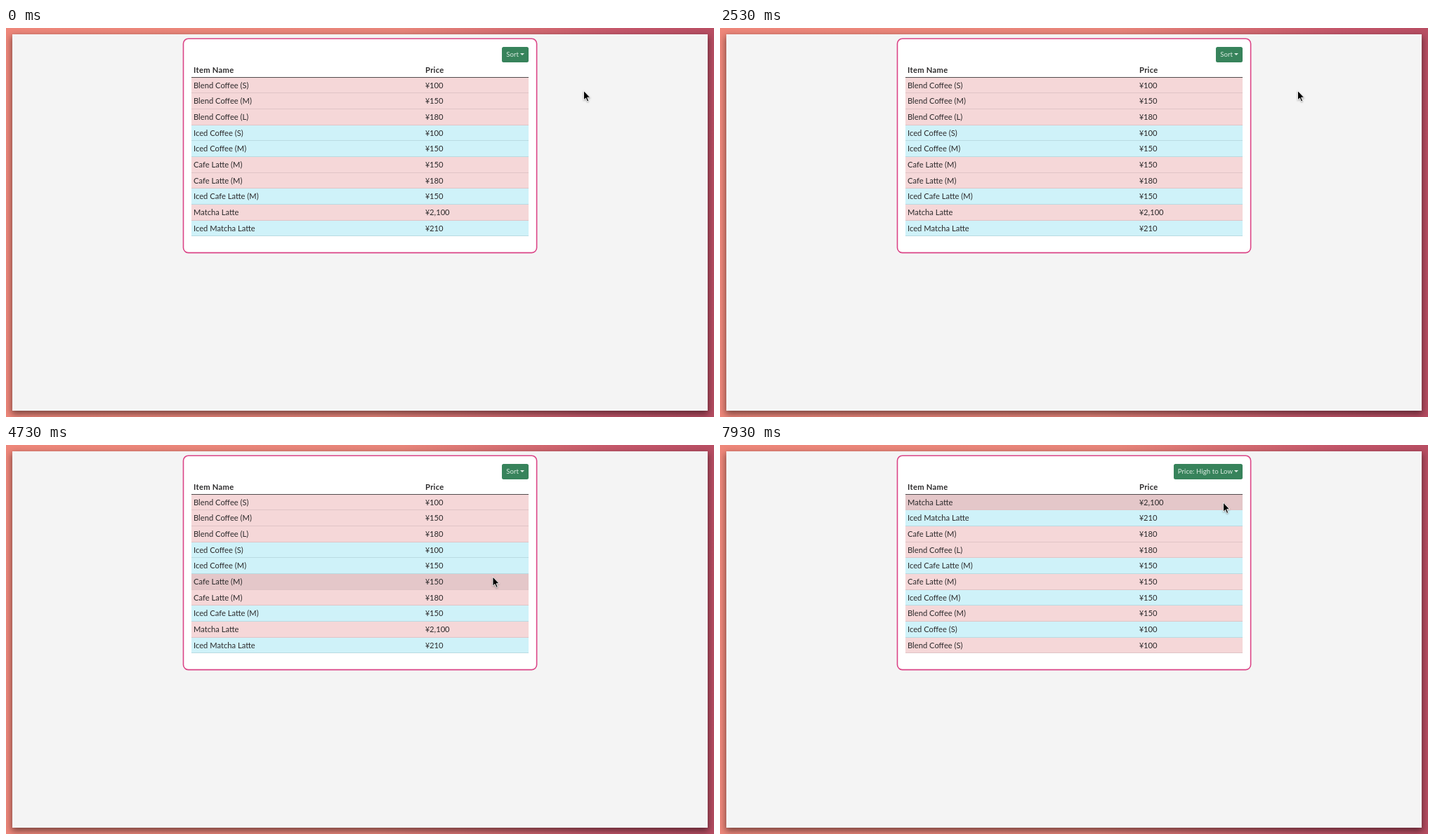
These frames come from a looping animation (1008 by 555 pixels, 8 s). An HTML page:

```html
<!DOCTYPE html>
<html lang="en">
<head>
<meta charset="utf-8">
<title>Sortable menu</title>
<style>
html, body { margin: 0; width: 100%; height: 100%; overflow: hidden; }
body {
  position: relative;
  background: linear-gradient(94deg, #ee877a 0, #e8857a 54%, #c4566a 84%, #b54c61);
  font: 11.2px/21px Lato, sans-serif;
  color: #2c2a2b;
}
div, svg { position: absolute; box-sizing: border-box; white-space: nowrap; }
#page { left: 9px; top: 9px; width: 990px; height: 537px; background: #f4f4f4; box-shadow: 0 4px 9px 1px #0007; }
#card { left: 0; top: 0; fill: #fff; stroke: #db4587; stroke-width: 1.6; }
#head { left: 264px; top: 48.5px; width: 480px; height: 22.5px; border-bottom: 1px solid #514b4c; font-weight: bold; letter-spacing: .3px; }
.row { left: 264px; width: 480px; height: 22.67px; border-bottom: 1px solid; line-height: 22px; }
.hot { background: #f5d7d8; border-color: #e0c4c6; }
.iced { background: #cff2f9; border-color: #b9dbe2; }
.hot.over { background: #e4c7c9; }
.iced.over { background: #bfe3eb; }
.name { left: 3px; top: 0; }
.price { left: 333px; top: 0; }
.price i { font: 11px/1 "Noto Sans CJK JP", "Noto Sans CJK", sans-serif; }
#bar { left: 0; top: 0; width: 744px; height: 0; }
#button {
  right: 0; top: 27px; height: 21.5px; padding: 0 14px 0 6px;
  border-radius: 2.5px; background: #37835b; color: #dcebe2; font-size: 9.6px; letter-spacing: .07px;
}
#button::after {
  content: ""; position: absolute; right: 6px; top: 9px;
  border: 3px solid transparent; border-top-color: #dcebe2; border-bottom: 0;
}
#button.over { background: #1d6d45; }
#button.focus { box-shadow: 0 0 0 2.4px #9cc4ae; }
#menu { left: 631px; top: 50px; width: 113px; height: 56px; border: 1px solid #ccc; border-radius: 3px; background: #fff; }
.item { left: 0; width: 100%; height: 22px; padding-left: 11px; }
.item.over { background: #e9ecef; }
#loader { left: 9px; top: 9px; width: 990px; height: 537px; background: #fff; border-top: 3px solid #3b2a32; }
#sweep { top: -3px; width: 129px; height: 3px; background: #6db4d2; }
#arrow, #hand { left: 0; top: 0; overflow: visible; filter: drop-shadow(0 1px 1px #0005); }
</style>
</head>
<body>
<div id="page"></div>
<svg id="card" width="1008" height="555"><rect x="252.5" y="15.3" width="503.1" height="305.3" rx="7"/></svg>
<div id="head"><div class="name">Item Name</div><div class="price">Price</div></div>
<div id="rows"></div>
<div id="bar"><div id="button"></div></div>
<div id="menu">
  <div class="item" style="top:5px">Price: Low to High</div>
  <div class="item" style="top:27px">Price: High to Low</div>
</div>
<div id="loader"><div id="sweep"></div></div>
<svg id="arrow" width="12" height="18"><path d="M0 0V13.2L3 10.5L5.1 15.4L7.2 14.5L5.1 9.7H9.2Z" stroke="#fff" stroke-width=".9"/></svg>
<svg id="hand" width="14" height="18"><path transform="translate(.9 -.6)" d="M-1.2 1Q0-.6 1.3 1L2.3 5Q3.5 4 4.5 5.2Q5.8 4.4 6.6 5.8Q8.3 5.2 8.7 7L9 10.5L7.6 15H.8L-4 9.5Q-4.4 7.5-2.4 8L-.2 9.8Z" fill="#fff" stroke="#111" stroke-width="1.1"/><path d="M3.2 9.5V12.5M5.2 9.5V12.5M7.2 9.5V12.5" stroke="#111" stroke-width=".8"/></svg>

<script>
const LOOP = 8000, LOAD = 600, READY = 1400, PRESS = 5750, OPEN = 5870, PICK = 7350;
const ROW_TOP = 70.7, ROW_H = 22.67;
const items = [
  ["Blend Coffee (S)", 100], ["Blend Coffee (M)", 150], ["Blend Coffee (L)", 180],
  ["Iced Coffee (S)", 100], ["Iced Coffee (M)", 150],
  ["Cafe Latte (M)", 150], ["Cafe Latte (M)", 180], ["Iced Cafe Latte (M)", 150],
  ["Matcha Latte", 2100], ["Iced Matcha Latte", 210]
];
const sorted = [...items].sort((a, b) => a[1] - b[1]).reverse();

// pointer stops: time, x, y
const stops = [
  [0, 822.5, 89.5], [2750, 822.5, 89.5], [3400, 690, 100], [3800, 685, 112],
  [4350, 686, 114], [4730, 693, 188], [5000, 696, 280], [5120, 697, 280],
  [5550, 739, 38.5], [6150, 739, 38.5], [6550, 722, 66], [6950, 716.5, 82], [LOOP, 716.5, 82]
];

const $ = id => document.getElementById(id);
const show = (el, on) => el.style.visibility = on ? "visible" : "hidden";
const mark = (el, name, on) => el.classList.toggle(name, on);
const choices = document.querySelectorAll(".item");

function pointer(t) {
  const i = stops.findIndex(s => s[0] > t);
  const [t0, x0, y0] = stops[i - 1], [t1, x1, y1] = stops[i];
  const p = (t - t0) / (t1 - t0), e = p * p * (3 - 2 * p);
  return [x0 + (x1 - x0) * e, y0 + (y1 - y0) * e];
}

let order;
function fill(list) {
  if (order === list) return;
  order = list;
  $("rows").innerHTML = list.map(([name, price], i) =>
    `<div class="row ${name.startsWith("Iced") ? "iced" : "hot"}" style="top:${ROW_TOP + i * ROW_H}px">
      <div class="name">${name}</div><div class="price"><i>¥</i>${price.toLocaleString("en")}</div></div>`).join("");
  $("button").textContent = list === sorted ? "Price: High to Low" : "Sort";
}

function draw(t) {
  const [x, y] = pointer(t);
  const loading = t >= LOAD && t < READY, open = t >= OPEN && t < PICK;
  fill(t < PICK ? items : sorted);

  const onButton = x > 706 && x < 744 && y > 27 && y < 48.5;
  const onMenu = open && x > 631 && x < 744 && y > 50 && y < 106;
  const inTable = x > 264 && x < 744 && !onMenu;
  [...$("rows").children].forEach((row, i) =>
    mark(row, "over", inTable && Math.floor((y - ROW_TOP) / ROW_H) === i));
  choices.forEach((item, i) =>
    mark(item, "over", onMenu && Math.floor((y - 56) / 22) === i));

  mark($("button"), "over", onButton || open);
  mark($("button"), "focus", t >= PRESS && t < PICK);
  show($("menu"), open);
  show($("loader"), loading);
  show($("sweep"), loading);
  $("sweep").style.left = -129 + (t - LOAD) * .494 + "px";
  $("loader").style.clipPath = "inset(0)";

  show($("hand"), onButton || onMenu);
  show($("arrow"), !onButton && !onMenu);
  for (const id of ["arrow", "hand"]) $(id).style.transform = `translate(${x}px, ${y}px)`;
}

function tick() {
  draw(performance.now() % LOOP);
  requestAnimationFrame(tick);
}
tick();
</script>
</body>
</html>
```
